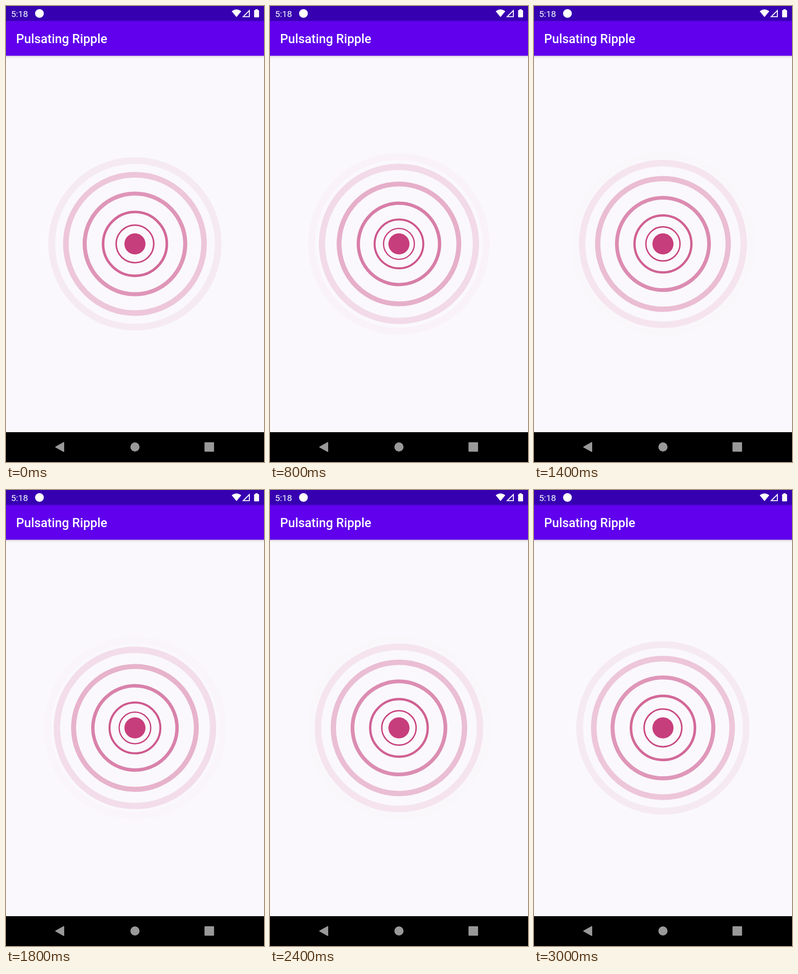
An HTML page without scripts that plays this animation: 563 px wide and 994 px high, repeating every 3.1 s.

```html
<!DOCTYPE html>
<html lang="en">
<head>
<meta charset="utf-8">
<title>Pulsating Ripple</title>
<style>
  @property --t {
    syntax: "<number>";
    inherits: true;
    initial-value: 0.154;
  }

  html, body {
    margin: 0;
    width: 100%;
    height: 100%;
    overflow: hidden;
    background: #faf8fc;
  }

  svg {
    display: block;
    width: 563px;
    height: 994px;
  }

  text {
    font-family: Roboto, sans-serif;
    fill: #fff;
  }

  .clock { font-size: 19.2px; }
  .title { font-size: 27.4px; font-weight: 500; }

  .ripples {
    animation: advance 3100ms infinite;
  }

  /* --p is a ring's progress from 0 to 1, --y the same eased by a cosine */
  .ripples circle {
    --p: mod(var(--t) + var(--k) / 6, 1);
    --y: calc((1 - cos(var(--p) * 180deg)) / 2);
    --r: calc(31.7px + 162.5px * var(--y));
    r: var(--r);
    stroke-width: calc(var(--r) * 0.081);
    opacity: calc(1 - var(--y));
    fill: none;
    stroke: #c73e7c;
  }

  /* Ten poses per second, with slightly uneven pace */
  @keyframes advance {
    0%       { --t: 0.154;  animation-timing-function: steps(5); }
    16.129%  { --t: 0.3072; animation-timing-function: steps(3); }
    25.8065% { --t: 0.4033; animation-timing-function: steps(6); }
    45.1613% { --t: 0.618;  animation-timing-function: steps(4); }
    58.0645% { --t: 0.7497; animation-timing-function: steps(6); }
    77.4194% { --t: 0.9546; animation-timing-function: steps(6); }
    96.7742%, 100% { --t: 1.155; }
  }
</style>
</head>
<body>
<svg viewBox="0 0 563 994">
  <defs>
    <linearGradient id="shade" x2="0" y2="1">
      <stop offset="0" stop-color="#000" stop-opacity=".13"/>
      <stop offset="1" stop-color="#000" stop-opacity="0"/>
    </linearGradient>
  </defs>

  <rect width="563" height="994" fill="#faf8fc"/>

  <g class="ripples" transform="translate(281.4 518.6)">
    <circle style="--k: 0"/>
    <circle style="--k: 1"/>
    <circle style="--k: 2"/>
    <circle style="--k: 3"/>
    <circle style="--k: 4"/>
    <circle style="--k: 5"/>
  </g>
  <circle cx="281.4" cy="518.6" r="23" fill="#c73e7c"/>

  <!-- App bar -->
  <rect y="108" width="563" height="6" fill="url(#shade)"/>
  <rect y="32" width="563" height="76.5" fill="#6000ec"/>
  <text class="title" x="21.9" y="81">Pulsating Ripple</text>

  <!-- Status bar -->
  <rect width="563" height="32.5" fill="#3600b1"/>
  <text class="clock" x="11" y="23.5">5:18</text>
  <g fill="#fff">
    <circle cx="73" cy="16.3" r="9.5"/>
    <path d="M503 24.3 492.6 11.4Q503 3.6 513.4 11.4Z"/>
    <path d="M532 7.5V24.3H515.2ZM530 12.4 520 22.3H530Z" fill-rule="evenodd"/>
    <path d="M544.3 7h5v2h1.6q1.3 0 1.3 1.3V23.500q0 1.300-1.300 1.300H542.700q-1.300 0-1.300-1.300V10.300q0-1.300 1.300-1.300h1.600Z"/>
  </g>

  <!-- Navigation bar -->
  <rect y="929" width="563" height="65" fill="#000"/>
  <g fill="#999" stroke="#999" stroke-width="2" stroke-linejoin="round">
    <path d="M108.500 961.300 126 951.500V971.100Z"/>
    <circle cx="281.400" cy="961.300" r="9"/>
    <rect x="434.200" y="952" width="18.800" height="18.600"/>
  </g>
</svg>
</body>
</html>
```
